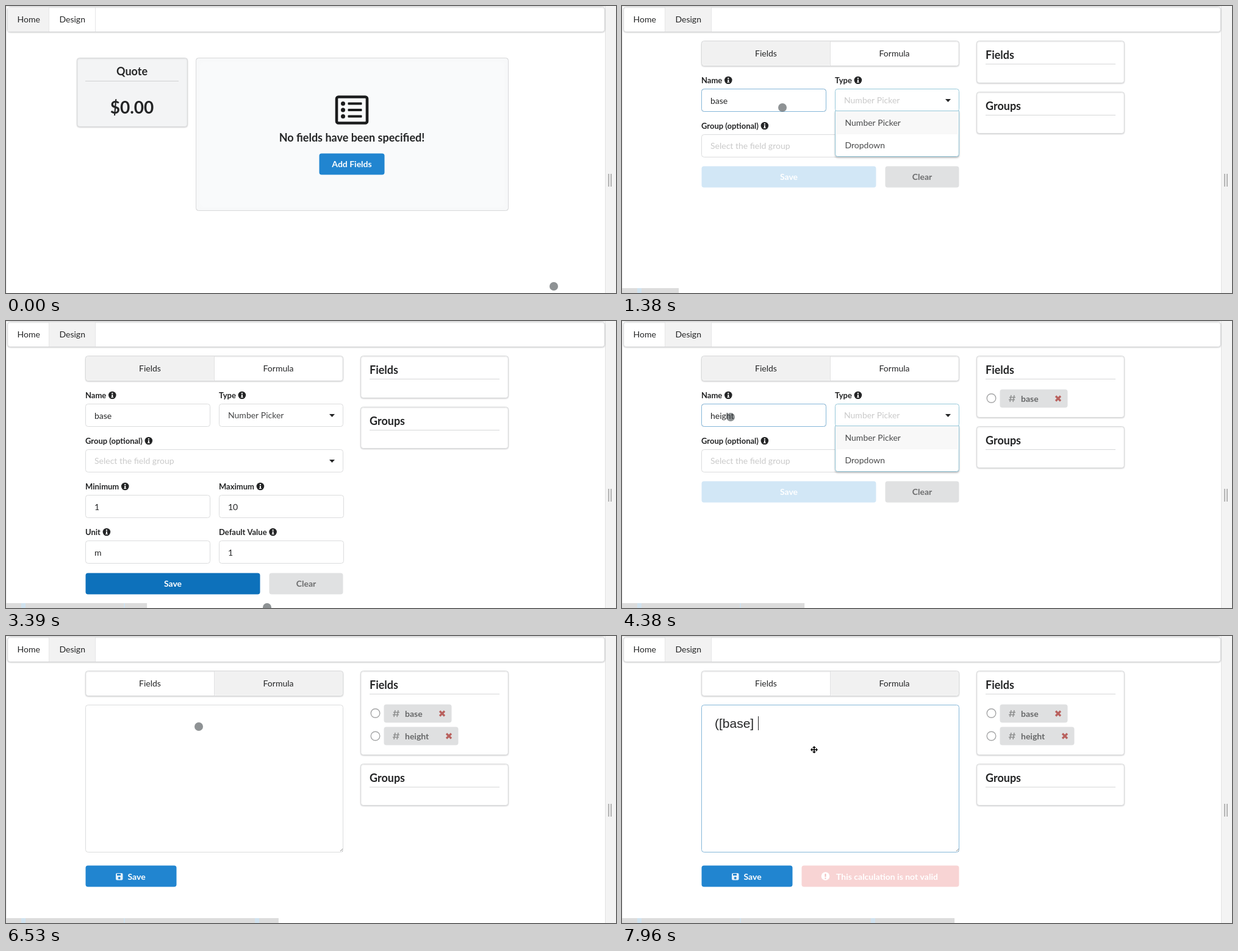
These frames come from a looping animation (1000 px wide and 472 px high, 8000 ms). An HTML page with a canvas:

```html
<!DOCTYPE html>
<html lang="en">
<head>
<meta charset="utf-8">
<title>Quote designer</title>
<style>
  html, body { margin: 0; width: 100%; height: 100%; overflow: hidden; background: #fff; }
  canvas { display: block; width: 1000px; height: 472px; }
</style>
</head>
<body>
<canvas id="stage" width="1000" height="472"></canvas>
<script>
const c = document.getElementById('stage').getContext('2d');
const LOOP = 8000;
const INK = '#242526', LINE = '#dbdcdd', FOCUS = '#85b7d9', BLUE = '#2185d0', GREY = '#e0e1e2';
const DESIGN_AT = 450, FORMULA_AT = 6290, GRAB_AT = 7500, DROP_AT = 7800;

// Start times of each step while filling in one field definition
const entries = [
  { name: 'base', focus: 880, type: 960, typed: 1280, open: 1350, pick: 1480, group: 1740,
    min: 1980, max: 2200, unit: 2600, def: 2900, tabbed: 3260, save: 3440 },
  { name: 'height', focus: 3850, type: 3920, typed: 4280, open: 4350, pick: 4480, group: 4620,
    min: 4780, max: 4930, unit: 5200, def: 5480, tabbed: 5840, save: 5860 }
];

// Pointer stops: time, x, y
const path = [
  [50, 898, 461], [430, 108, 23], [520, 108, 23], [820, 263, 167], [2960, 263, 167],
  [3090, 165, 347], [3160, 165, 347], [3350, 428, 471], [3420, 428, 471], [3800, 178, 158],
  [5610, 178, 158], [5720, 166, 349], [5820, 270, 431], [5890, 270, 431], [6130, 400, 14],
  [6240, 446, 78], [6320, 446, 78], [6500, 316, 149], [6880, 316, 149], [7250, 654, 100],
  [7400, 654, 128], [7520, 654, 128], [7800, 315, 187]
];

const clamp = v => Math.max(0, Math.min(1, v));
const during = (t, a, b) => t >= a && t < b;

function pointer(t) {
  const i = path.findIndex(p => p[0] > t);
  if (i < 0) return path[path.length - 1].slice(1);
  if (i === 0) return path[0].slice(1);
  const [t0, x0, y0] = path[i - 1], [t1, x1, y1] = path[i];
  let k = (t - t0) / (t1 - t0);
  k = k * k * (3 - 2 * k);
  return [x0 + (x1 - x0) * k, y0 + (y1 - y0) * k];
}

function rect(x, y, w, h, color) {
  c.fillStyle = color;
  c.fillRect(x, y, w, h);
}

function box(x, y, w, h, fill, stroke, radius = 4) {
  c.beginPath();
  c.roundRect(x + .5, y + .5, w - 1, h - 1, radius);
  c.fillStyle = fill;
  c.fill();
  if (stroke) {
    c.strokeStyle = stroke;
    c.lineWidth = 1;
    c.stroke();
  }
}

function card(x, y, w, h, fill = '#fff') {
  c.save();
  c.shadowColor = 'rgba(34,36,38,.15)';
  c.shadowOffsetY = 1;
  c.shadowBlur = 2;
  box(x, y, w, h, fill, '#d8d9da');
  c.restore();
}

function text(s, x, y, { size = 14, bold = false, color = INK, align = 'left', font = 'Lato' } = {}) {
  c.font = `${bold ? 'bold ' : ''}${size}px ${font}, sans-serif`;
  c.fillStyle = color;
  c.textAlign = align;
  c.fillText(s, x, y);
  return c.measureText(s).width;
}

function dot(x, y, r, color) {
  c.beginPath();
  c.arc(x, y, r, 0, 7);
  c.fillStyle = color;
  c.fill();
}

function strokes(color, width, ...lines) {
  c.beginPath();
  for (const [x0, y0, x1, y1] of lines) {
    c.moveTo(x0, y0);
    c.lineTo(x1, y1);
  }
  c.strokeStyle = color;
  c.lineWidth = width;
  c.stroke();
}

function button(label, x, y, w, fill, color = '#fff') {
  box(x, y, w, 36, fill);
  text(label, x + w / 2, y + 23, { bold: true, color, align: 'center' });
}

function label(s, x, y) {
  const cx = x + text(s, x, y, { size: 13, bold: true }) + 10, cy = y - 4.5;
  dot(cx, cy, 6.3, INK);
  rect(cx - 1, cy - 4, 2, 2, '#fff');
  rect(cx - 1, cy - 1, 2, 5, '#fff');
  rect(cx - 2, cy + 3, 4, 1, '#fff');
}

function input(name, x, y, value, focused) {
  label(name, x, y - 9.5);
  box(x, y, 205, 38, '#fff', focused ? FOCUS : LINE);
  const w = text(value, x + 15, y + 24.5);
  if (focused) rect(x + 16 + w, y + 12, 1, 16, '#3a7fae');
}

function select(name, x, y, w, value, { chosen = false, focused = false } = {}) {
  label(name, x, y - 9.5);
  box(x, y, w, 38, '#fff', focused ? '#96c8da' : LINE);
  text(value, x + 15, y + 23.5, { color: chosen ? '#444546' : '#cacaca' });
  c.beginPath();
  c.moveTo(x + w - 23, y + 17);
  c.lineTo(x + w - 14, y + 17);
  c.lineTo(x + w - 18.5, y + 22);
  c.fillStyle = INK;
  c.fill();
}

function typeMenu() {
  c.save();
  c.shadowColor = 'rgba(34,36,38,.2)';
  c.shadowOffsetY = 2;
  c.shadowBlur = 3;
  box(349, 172, 204, 76, '#fff', '#96c8da', [0, 0, 4, 4]);
  c.restore();
  rect(350, 173, 202, 38, '#f8f8f8');
  text('Number Picker', 365.5, 197, { color: '#4a4b4c' });
  text('Dropdown', 365.5, 234, { color: '#4a4b4c' });
}

function chip(name, x, y) {
  const w = name === 'base' ? 112 : 123, end = x + w - 16;
  box(x, y, w, 31, '#dfe0e1');
  strokes('#8f9090', 1.5,
    [x + 19, y + 10, x + 17, y + 21], [x + 24, y + 10, x + 22, y + 21],
    [x + 16, y + 13.5, x + 26, y + 13.5], [x + 15, y + 17.5, x + 25, y + 17.5]);
  text(name, x + 35, y + 20.5, { bold: true, color: '#666768' });
  strokes('#b9615e', 3.2, [end - 4, y + 11.5, end + 4, y + 19.5], [end + 4, y + 11.5, end - 4, y + 19.5]);
}

function panel(title, y, h) {
  card(581, y, 243, h);
  text(title, 596, y + 30, { size: 18, bold: true });
  rect(596, y + 38, 213, 1, '#d6d7d8');
}

function sidebar(t) {
  const saved = entries.filter(e => t >= e.save);
  const h = saved.length ? 64 + 37.5 * saved.length : 70;
  panel('Fields', 57, Math.round(h));
  saved.forEach((e, i) => {
    const y = 112 + 37.5 * i;
    c.beginPath();
    c.arc(605.5, y + 15, 7.3, 0, 7);
    c.strokeStyle = '#a5a6a7';
    c.lineWidth = 1.4;
    c.stroke();
    chip(e.name, 619, Math.floor(y));
  });
  panel('Groups', 71 + Math.round(h), 69);
}

function tabs(formula) {
  card(130, 57, 423, 42);
  box(formula ? 341 : 131, 58, 211, 40, '#f1f1f1', null, 3);
  rect(341, 58, 1, 40, '#e2e2e3');
  text('Fields', 236, 83, { align: 'center' });
  text('Formula', 446.5, 83, { align: 'center' });
}

function fieldForm(t) {
  const e = entries.find(v => t < v.save) || { name: '', focus: 1e9 };
  const picked = t >= e.pick, opened = during(t, e.open, e.pick);
  const shown = (s, at) => t >= at + 80 ? s : t >= at + 40 ? s.slice(0, 1) : '';
  const letters = Math.ceil(clamp((t - e.type) / (e.typed - e.type)) * e.name.length) || 0;

  input('Name', 130, 136, e.name.slice(0, letters), during(t, e.focus, e.open));
  if (opened && t < e.open + 70) box(130, 136, 205, 38, 'transparent', FOCUS);
  select('Type', 349, 136, 204, 'Number Picker', { chosen: picked, focused: opened });
  select('Group (optional)', 130, 211, 423, 'Select the field group', { focused: during(t, e.group, e.min) });

  const y = picked ? 414 : 263;
  if (picked) {
    input('Minimum', 130, 286, shown('1', e.min), during(t, e.min, e.max));
    input('Maximum', 349, 286, shown('10', e.max), during(t, e.max, e.unit));
    input('Unit', 130, 361, shown('m', e.unit), during(t, e.unit, e.def));
    input('Default Value', 349, 361, shown('1', e.def), during(t, e.def, e.tabbed));
  }
  const ready = .2 + .8 * clamp((t - e.def - 40) / 70 || 0);
  button('Save', 130, y, 287, t >= e.tabbed ? '#0d71bb' : `rgba(33,133,208,${ready})`);
  button('Clear', 431, y, 122, GREY, '#6c6d6e');
  if (opened) typeMenu();
}

function formulaForm(t) {
  const focused = t >= 6660;
  box(130, 113, 423, 243, '#fff', focused ? FOCUS : LINE);
  strokes('#8a8a8a', 1, [548, 354, 552, 350], [551, 354, 552, 353]);
  const formula = (t >= 6800 ? '(' : '') + (t >= DROP_AT ? '[base] ' : '');
  const w = text(formula, 152, 151, { size: 21, font: 'Liberation Sans' });
  if (focused) rect(153 + Math.round(w), 132, 1, 23, INK);

  box(130, 377, 150, 36, BLUE);
  box(179.5, 389.5, 12.5, 12.5, '#e4f0f9', null, 2);
  rect(182, 391, 6, 3, BLUE);
  dot(185.7, 398, 2, BLUE);
  text('Save', 199.5, 400.5, { bold: true, color: '#fff' });

  const fade = clamp((t - 6840) / 80);
  if (!fade) return;
  c.globalAlpha = fade;
  box(294, 377, 259, 36, '#f8d4d4');
  dot(333.5, 395, 6.8, '#fff');
  rect(332.5, 391, 2, 5, '#f3bcbc');
  rect(332.5, 397.5, 2, 2, '#f3bcbc');
  text('This calculation is not valid', 351, 400.5, { bold: true, color: '#fff' });
  c.globalAlpha = 1;
}

function home() {
  card(116, 85, 182, 114, '#f3f4f5');
  text('Quote', 206.5, 114, { size: 18, bold: true, align: 'center' });
  rect(130, 123, 153, 1, '#d0d1d2');
  text('$0.00', 206.5, 177, { size: 28, bold: true, align: 'center' });

  c.save();
  box(311, 85, 513, 252, '#f9fafb', '#d9dadb');
  c.clip();
  c.shadowColor = 'rgba(34,36,38,.12)';
  c.shadowBlur = 10;
  c.strokeStyle = '#d9dadb';
  c.stroke();
  c.restore();

  c.beginPath();
  c.roundRect(542, 149.5, 50, 43, 3);
  c.strokeStyle = '#1b1c1d';
  c.lineWidth = 4.6;
  c.stroke();
  for (const y of [160.5, 171, 181.5]) {
    dot(552.5, y, 3.5, '#1b1c1d');
    box(560, y - 2.5, 24, 5, '#1b1c1d', null, 1);
  }
  text('No fields have been specified!', 567, 223, { size: 18, bold: true, align: 'center' });
  button('Add Fields', 513, 242, 108, BLUE);
}

function chrome(designing) {
  rect(0, 0, 1000, 472, '#fff');
  rect(0, 0, 1, 472, '#ececec');
  rect(0, 0, 982, 1, '#e4e4e4');
  rect(982, 0, 18, 472, '#f3f3f3');
  rect(982, 0, 1, 472, '#e3e3e3');
  rect(987, 276, 2, 21, '#b4b4b4');
  rect(991, 276, 2, 21, '#b4b4b4');
  card(2, 1, 980, 42);
  rect(designing ? 71 : 3, 2, designing ? 75 : 68, 40, '#f2f2f2');
  rect(70, 2, 1, 40, '#e6e6e7');
  rect(146, 2, 1, 40, '#e6e6e7');
  text('Home', 18.5, 27);
  text('Design', 87.5, 27);
}

function progress(t) {
  const w = t * .0687 - 1.8;
  if (w <= 0) return;
  rect(0, 464, w, 8, '#dcdcdc');
  for (const [x, size] of [[25, 7], [193, 2], [408, 7]])
    if (w > x) rect(x, 464, Math.min(size, w - x), 8, '#d0e2ef');
}

function drawPointer(t) {
  const [x, y] = pointer(t);
  if (t < GRAB_AT) return dot(x, y, 7, 'rgba(60,68,70,.58)');
  if (t < DROP_AT) {
    c.globalAlpha = .5;
    chip('base', x - 35, y - 16);
    c.globalAlpha = 1;
  }
  strokes('#000', 1.6, [x - 4, y, x + 4, y], [x, y - 4, x, y + 4]);
  c.fillStyle = '#000';
  for (const [dx, dy] of [[1, 0], [-1, 0], [0, 1], [0, -1]]) {
    c.beginPath();
    c.moveTo(x + dx * 6, y + dy * 6);
    c.lineTo(x + dx * 3 + dy * 3, y + dy * 3 + dx * 3);
    c.lineTo(x + dx * 3 - dy * 3, y + dy * 3 - dx * 3);
    c.fill();
  }
}

function frame(now) {
  const t = now % LOOP;
  const designing = t >= DESIGN_AT, formula = t >= FORMULA_AT;
  chrome(designing);
  if (designing) {
    tabs(formula);
    sidebar(t);
    formula ? formulaForm(t) : fieldForm(t);
  } else {
    home();
  }
  progress(t);
  drawPointer(t);
  requestAnimationFrame(frame);
}
requestAnimationFrame(frame);
</script>
</body>
</html>
```
